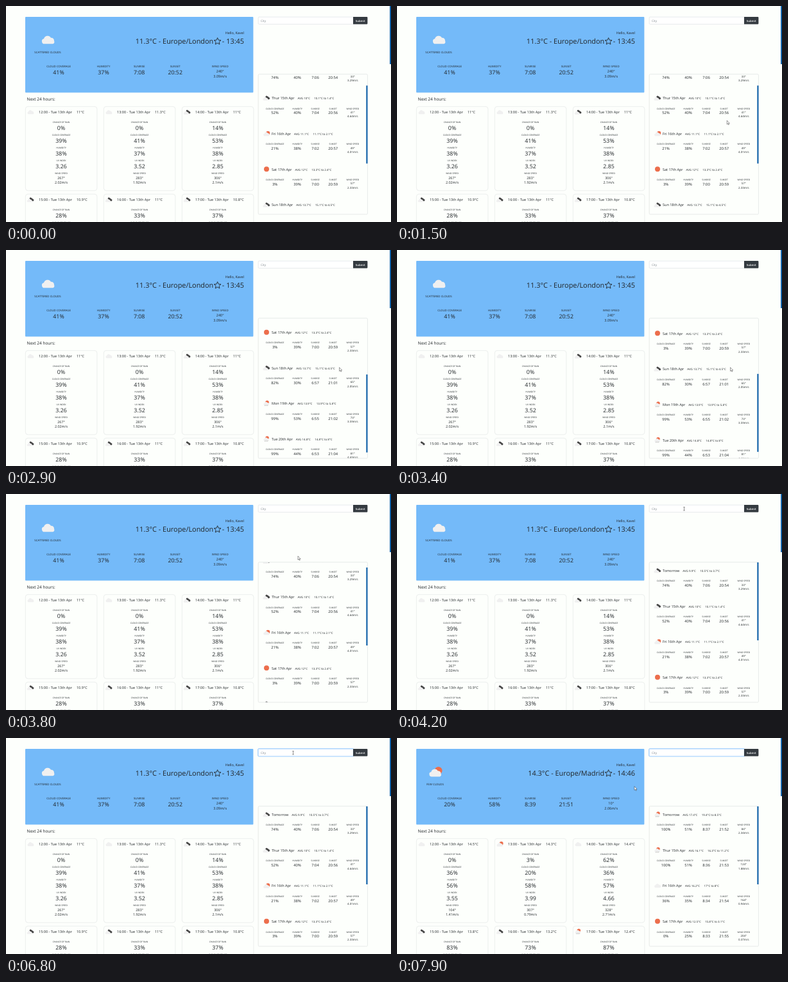
Recreate the animation shown at these times as an HTML page. Size 600 by 338 pixels, loop 8000 ms.

```html
<!DOCTYPE html>
<html lang="en">
<head>
<meta charset="utf-8">
<title>Weather dashboard</title>
<style>
  html, body { margin: 0; width: 100%; height: 100%; overflow: hidden; background: #fdfffc; }
  svg { display: block; width: 600px; height: 338px; }
  text { font-family: "Open Sans", "Noto Sans", sans-serif; fill: #212529; text-rendering: geometricPrecision; white-space: pre; }
</style>
</head>
<body>
<svg viewBox="0 0 600 338">
  <defs><clipPath id="listClip"><rect x="393.5" y="107" width="169.5" height="218.7"/></clipPath></defs>
  <rect width="600" height="338" fill="#fdfffc"/>
  <rect x="598" width="2" height="91" fill="#1766ab"/>
  <rect x="30" y="17" width="355.4" height="118.5" rx="1" fill="#74baf9"/>
  <g id="main"></g>
  <g clip-path="url(#listClip)"><g id="rows"></g></g>
  <rect x="393.2" y="106.7" width="170.2" height="219.3" rx="1.5" fill="none" stroke="#d9dcdc" stroke-width=".6"/>
  <rect id="thumb" x="561.3" width="2.2" height="122" fill="#1766ab"/>
  <rect id="ring" x="392.5" y="16.5" width="149.3" height="12.4" rx="1.6" fill="none" stroke="#007bff" stroke-opacity=".3"/>
  <rect id="field" x="393.2" y="17.2" width="148" height="11.2" rx="1.2" fill="#fff" stroke="#ced4da" stroke-width=".5"/>
  <path d="M541 16.9h21.2a1.2 1.2 0 0 1 1.2 1.2v9.1a1.2 1.2 0 0 1-1.2 1.2H541z" fill="#343a40"/>
  <text x="552.2" y="24.5" font-size="4.3" font-weight="600" text-anchor="middle" style="fill:#fff">Submit</text>
  <text id="entry" x="397" y="24.6" font-size="4.6"></text>
  <path id="caret" d="M397 20.2v5.4" stroke="#333" stroke-width=".4"/>
  <path id="arrow" d="M0 0v6l1.4-1.3 1 2.1.8-.4-1-2h1.9z" fill="#fff" stroke="#222" stroke-width=".45"/>
  <path id="beam" d="M-1.2-2.7h.9q.3 0 .3.3v4.8q0 .3-.3.3h-.9M1.2-2.7H.3Q0-2.7 0-2.4M0 2.4q0 .3.3.3h.9" fill="none" stroke="#222" stroke-width=".5"/>
</svg>
<script>
const LOOP = 8000, STEP = 100, ROW = 55.7;
const $ = id => document.getElementById(id);

// now: clouds, humidity, wind angle, wind speed.
// hours: icon, temperature, rain, then clouds, humidity, UV, wind angle, wind speed.
// days: icon, average, high, low, clouds, humidity; sun times (minutes) and wind follow the day number.
const cities = {
  London: {
    icon: "cloud", iconX: 65.5, sky: "SCATTERED CLOUDS", temp: "11.3", time: "13:45", now: "41 37 240 3.09",
    hours: ["cloud 11 0 39 38 3.26 267 2.02", "cloud 11.3 0 41 37 3.52 283 1.92", "dark 11 14 53 38 2.85 306 2.1",
      "dark 10.9 28", "dark 11 33", "dark 10.8 37"],
    days: ["dark 9.9 10.5 3.7 74 40", "dark 10 10.1 1.4 52 40", "few 11.1 11.1 2.1 21 38", "sun 12 13.3 2.4 3 39",
      "dark 13.7 15.1 4.5 82 30", "rain 13.9 13.9 5.8 99 53", "rain 14.8 14.8 8 99 44"],
    sunrise: day => 426 - 2.15 * day,
    sunset: day => 1254 + 1.65 * day,
    wind: day => [33 + 8 * day, 3.29 + 1.4 * Math.sin(1.3 * day)]
  },
  Madrid: {
    icon: "few", iconX: 60, sky: "FEW CLOUDS", temp: "14.3", time: "14:46", now: "20 58 10 2.06",
    hours: ["cloud 14.5 0 36 56 3.55 104 1.41", "few 14.3 3 20 58 3.99 307 0.79", "cloud 14.4 62 36 57 4.66 328 2.71",
      "dark 13.8 83", "dark 13.2 73", "rain 12.4 87"],
    days: ["rain 17.4 19.4 8.5 100 51", "rain 16.1 16.3 11.2 100 51", "cloud 16.2 17 8 36 35", "sun 12.5 15.8 3.1 0 25"],
    sunrise: day => 517.2 - 1.4 * day,
    sunset: day => 1312 + day,
    wind: day => [84 + 40 * day, 1.35 + .99 * Math.cos(day)]
  }
};
const weekdays = ["Thur", "Fri", "Sat", "Sun", "Mon", "Tue"];
const dayName = day => day ? `${weekdays[day - 1]} ${14 + day}th Apr` : "Tomorrow";
const nowLabels = ["CLOUD COVERAGE", "HUMIDITY", "SUNRISE", "SUNSET", "WIND SPEED"];
const hourLabels = ["CHANCE OF RAIN", "CLOUD COVERAGE", "HUMIDITY", "UV INDEX", "WIND SPEED"];

function clock(minutes) {
  const m = Math.round(minutes);
  return `${Math.floor(m / 60)}:${String(m % 60).padStart(2, "0")}`;
}

const text = (x, y, size, content, anchor = "middle") =>
  `<text x="${x}" y="${y}" font-size="${size}" text-anchor="${anchor}">${content}</text>`;

const cloud = (x, y, scale) =>
  `<path transform="translate(${x} ${y}) scale(${scale})" fill="#f0f0f0" d="M-9.5 3a3.5 3.5 0 0 1 3-4.5a6 6 0 0 1 11-1.5a4.5 4.5 0 0 1 5 5a3 3 0 0 1-2 4.5h-13a3.5 3.5 0 0 1-4-3.5z"/>`;
const sun = (x, y, r) => `<circle cx="${x}" cy="${y}" r="${r}" fill="#ec6e4c"/>`;
const icons = {
  cloud: cloud(0, 0, 1),
  dark: `<path d="M0-3.5L7 1.5" stroke="#484848" stroke-width="6.5" stroke-linecap="round"/>` + cloud(-3.5, 2.5, .8),
  few: sun(4.5, -1.8, 6) + cloud(-.5, 1.5, .95),
  sun: sun(0, 0, 8),
  rain: sun(2, -3.5, 5.5) + cloud(-1, .5, .85) +
    `<path d="M-4 5l-1.5 3M0 5l-1.5 3M4 5l-1.5 3" stroke="#777"/>`
};
const icon = (kind, x, y, scale) => `<g transform="translate(${x} ${y}) scale(${scale})">${icons[kind]}</g>`;

// A row of labelled readings; the last one is wind with angle and speed.
function readings(city, day, clouds, humidity, wind, centers, y, size) {
  const values = [clouds + "%", humidity + "%", clock(city.sunrise(day)), clock(city.sunset(day))];
  return nowLabels.map((label, i) => {
    const x = centers[i];
    return text(x, y, size.label, label) + (i < 4
      ? text(x, y + size.drop, size.value, values[i])
      : text(x, y + size.windDrop, size.wind, wind[0] + "°") +
        text(x, y + size.windDrop + size.windLine, size.wind, wind[1] + "m/s"));
  }).join("");
}

function header(name, city) {
  const star = Array.from({ length: 10 }, (_, i) => {
    const r = i % 2 ? 2.6 : 5.7, a = i * Math.PI / 5;
    return `${329.6 + r * Math.sin(a)},${55.4 - r * Math.cos(a)}`;
  });
  const [clouds, humidity, ...wind] = city.now.split(" ");
  return icon(city.icon, city.iconX, 52.8, 1) +
    text(city.iconX - .5, 73.6, 4.35, city.sky) +
    text(371, 44, 5.45, "Hello, Kavel", "end") +
    text(323.3, 59.2, 10.9, `${city.temp}°C - Europe/${name}`, "end") +
    text(371, 59.2, 10.9, `- ${city.time}`, "end") +
    `<polygon points="${star.join(" ")}" fill="none" stroke="#212529" stroke-width=".9" stroke-linejoin="round"/>` +
    readings(city, -1, clouds, humidity, wind, [82, 152, 207.7, 263.7, 333.7], 96,
      { label: 4.35, value: 8.8, wind: 5.5, drop: 11.2, windDrop: 8.2, windLine: 7.6 }) +
    text(32.5, 147.6, 6.5, "Next 24 hours:", "start");
}

function hourCard(line, i) {
  const [kind, temp, rain, clouds, humidity, uv, angle, speed] = line.split(" ");
  const x = 30 + 122 * (i % 3), y = 157 + 137 * Math.floor(i / 3), mid = x + 56;
  const values = [rain + "%", clouds + "%", humidity + "%", uv];
  return `<rect x="${x + .3}" y="${y + .3}" width="111.6" height="131.6" rx="4" fill="none" stroke="#dfe2e2" stroke-width=".6"/>` +
    icon(kind, x + 8.3, y + 9, .5) +
    text(x + 21, y + 11, 5.55, `${12 + i}:00 - Tue 13th Apr<tspan dx="7">${temp}°C</tspan>`, "start") +
    hourLabels.map((label, k) => {
      const top = y + 26.2 + 20 * k;
      return text(mid, top, 3.3, label) + (k < 4
        ? text(mid, top + 10.9, 8.8, values[k])
        : text(mid, top + 7.8, 5.4, angle + "°") + text(mid, top + 14.8, 5.4, speed + "m/s"));
    }).join("");
}

function dayRow(city, line, day) {
  const [kind, avg, high, low, clouds, humidity] = line.split(" ");
  const [angle, speed] = city.wind(day);
  const y = 120 + ROW * day;
  return icon(kind, 406, y - .3, .5) +
    text(414, y + 1.9, 5.5, `${dayName(day)}<tspan dx="5" font-size="4.45">AVG ${avg}°C</tspan>` +
      `<tspan dx="6.3" font-size="4.45">${high}°C to ${low}°C</tspan>`, "start") +
    readings(city, day, clouds, humidity, [angle, speed.toFixed(2)], [419, 454, 482, 509.7, 540.3], y + 17.4,
      { label: 3.3, value: 5.8, wind: 4.4, drop: 7.8, windDrop: 6.2, windLine: 6.3 });
}

let shownCity;
function showCity(name) {
  if (name === shownCity) return;
  shownCity = name;
  const city = cities[name];
  $("main").innerHTML = header(name, city) + city.hours.map(hourCard).join("");
  $("rows").innerHTML = city.days.map((line, day) => dayRow(city, line, day)).join("");
}

const clamp = (v, low, high) => Math.min(high, Math.max(low, v));

// Distance covered at time t by a smooth move between two times.
function glide(t, from, to, distance) {
  const p = clamp((t - from) / (to - from), 0, 1);
  return distance * p * p * (3 - 2 * p);
}

const pointer = t => [
  575 + glide(t, 500, 1100, -61) + glide(t, 1400, 2200, 5.5) + glide(t, 3400, 3900, -72) + glide(t, 7600, 7900, -77.5),
  228 + glide(t, 500, 1100, -49) + glide(t, 1400, 2200, 4.7) + glide(t, 3400, 4160, -160.5) + glide(t, 7760, 7900, 52.5)
];

const show = (id, on) => $(id).setAttribute("visibility", on ? "visible" : "hidden");

function draw(t) {
  showCity(t < 7000 ? "London" : "Madrid");

  const scroll = 31.5 + glide(t, 2410, 3000, 137.1) + glide(t, 3300, 3910, -168.6);
  $("rows").setAttribute("transform", `translate(0 ${-scroll})`);
  $("thumb").setAttribute("y", 107 + scroll * .555);

  const focus = clamp((t - 4250) / 150, 0, 1);
  $("ring").setAttribute("opacity", focus);
  $("field").setAttribute("stroke", focus ? "#80bdff" : "#ced4da");

  // Two bursts of three keystrokes, cleared on submit.
  const keys = clamp((t - 5400) / 100, 0, 3) + clamp((t - 5900) / 100, 0, 3);
  const typed = t < 6500 ? "Madrid".slice(0, keys) : "";
  $("entry").textContent = typed || "City";
  $("entry").style.fill = typed ? "#495057" : "#7b838a";
  show("caret", t >= 6500 && t < 6800);

  const [x, y] = pointer(t);
  const overField = x > 393 && x < 541 && y > 17 && y < 28.5;
  for (const id of ["arrow", "beam"]) $(id).setAttribute("transform", `translate(${x} ${y})`);
  show("arrow", t >= 600 && !overField);
  show("beam", overField);
}

const start = performance.now();
function tick() {
  const t = (performance.now() - start) % LOOP;
  draw(Math.floor(t / STEP) * STEP);
  requestAnimationFrame(tick);
}
tick();
</script>
</body>
</html>
```
